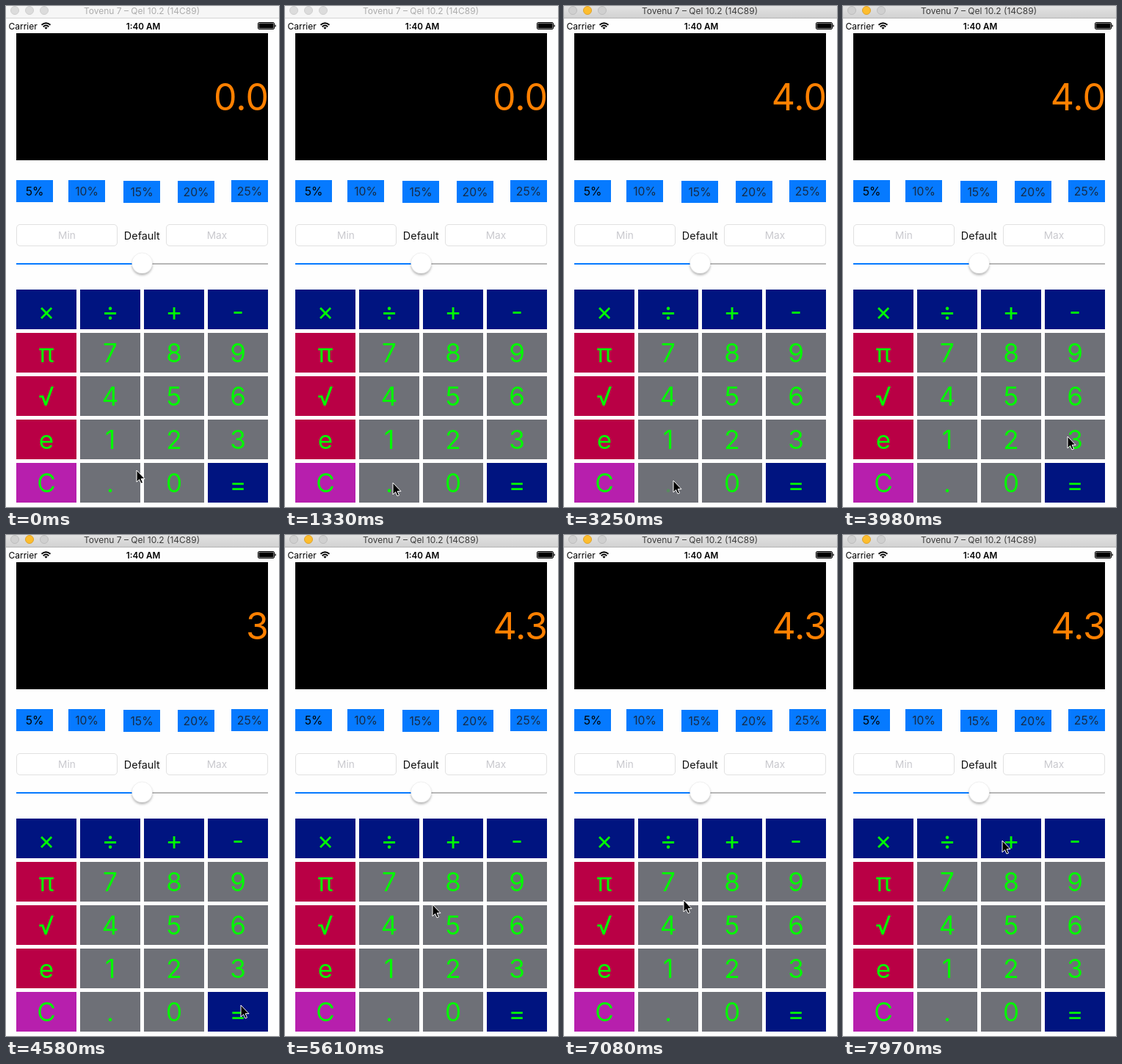
These frames come from a looping animation (372x682 px, 8000 ms). An HTML page:

```html
<!DOCTYPE html>
<html lang="en">
<head>
<meta charset="utf-8">
<title>Calculator</title>
<style>
  html, body { margin: 0; width: 100%; height: 100%; overflow: hidden; background: #fefefe; }
  svg { display: block; width: 372px; height: 682px; font-family: Inter, Roboto, sans-serif; }
  .mid { text-anchor: middle; }

  /* every animated part shares the 8 s loop and changes in hard steps */
  .anim { animation: 8s step-end infinite; }

  .active { animation-name: active; }
  @keyframes active { 0% { opacity: 0 } 29.5%, 100% { opacity: 1 } }

  .readout text { font-size: 50px; fill: #ff8000; text-anchor: end; }
  .r0 { animation-name: r0; }
  .r1 { animation-name: r1; }
  .r2 { animation-name: r2; }
  .r3 { animation-name: r3; }
  .r4 { animation-name: r4; }
  @keyframes r0 { 0% { opacity: 1 } 31.375%, 100% { opacity: 0 } }
  @keyframes r1 { 0% { opacity: 0 } 31.375% { opacity: 1 } 40.5%, 100% { opacity: 0 } }
  @keyframes r2 { 0% { opacity: 0 } 40.5% { opacity: 1 } 53.5%, 100% { opacity: 0 } }
  @keyframes r3 { 0% { opacity: 0 } 53.5% { opacity: 1 } 61%, 100% { opacity: 0 } }
  @keyframes r4 { 0% { opacity: 0 } 61%, 100% { opacity: 1 } }

  .keys text { font-size: 35px; fill: #00fa00; text-anchor: middle; }
  .press-four { animation-name: press-four; }
  .press-dot { animation-name: press-dot; }
  .press-three { animation-name: press-three; }
  .press-equals { animation-name: press-equals; }
  @keyframes press-four { 0%, 31.375%, 100% { opacity: 1 } 29.5% { opacity: .2 } }
  @keyframes press-dot { 0%, 44.375%, 100% { opacity: 1 } 38.875% { opacity: .2 } }
  @keyframes press-three { 0%, 53.5%, 100% { opacity: 1 } 51.625% { opacity: .2 } }
  @keyframes press-equals { 0%, 61%, 100% { opacity: 1 } 59.125% { opacity: .2 } }

  .pointer { animation-name: pointer; }
  @keyframes pointer {
    0%      { transform: translate(178px, 632px); animation-timing-function: steps(2) }
    3.625%  { transform: translate(248px, 656px); animation-timing-function: steps(2) }
    7.25%   { transform: translate(204px, 656px) }
    12.875% { transform: translate(194px, 667px); animation-timing-function: steps(2) }
    16.6%   { transform: translate(147px, 649px); animation-timing-function: steps(5) }
    25.75%  { transform: translate(142px, 539px) }
    31.375% { transform: translate(142px, 539px); animation-timing-function: steps(4) }
    38.875% { transform: translate(149px, 646px) }
    42.5%   { transform: translate(149px, 647px); animation-timing-function: steps(4) }
    49.75%  { transform: translate(306px, 586px) }
    53.5%   { transform: translate(310px, 605px); animation-timing-function: steps(2) }
    57.2%   { transform: translate(320px, 640px) }
    63%     { transform: translate(320px, 640px); animation-timing-function: steps(4) }
    70.1%   { transform: translate(201px, 503px) }
    72%     { transform: translate(186px, 419px); animation-timing-function: steps(2) }
    75.625% { transform: translate(162px, 419px) }
    79.25%  { transform: translate(196px, 468px); animation-timing-function: steps(2) }
    83%     { transform: translate(287px, 632px); animation-timing-function: steps(3) }
    88.45%  { transform: translate(163px, 497px) }
    90.25%  { transform: translate(130px, 478px) }
    92.125% { transform: translate(147px, 462px); animation-timing-function: steps(4) }
    99.6%, 100% { transform: translate(217px, 416px) }
  }
</style>
</head>
<body>
<svg viewBox="0 0 372 682">
  <defs>
    <linearGradient id="bar" x2="0" y2="1">
      <stop stop-color="#e2e2e2"/><stop offset="1" stop-color="#d1d1d1"/>
    </linearGradient>
    <filter id="shadow" x="-30%" y="-30%" width="160%" height="170%">
      <feDropShadow dx="0" dy="2.5" stdDeviation="1.8" flood-opacity=".27"/>
    </filter>
  </defs>
  <rect width="372" height="682" fill="#fefefe"/>

  <!-- window title, idle then focused -->
  <g>
    <path d="M0 0H372V17H0Z" fill="#f6f6f6"/>
    <path d="M0 16.5H372" stroke="#d5d5d5"/>
    <g fill="#dcdcdc" stroke="#cfcfcf">
      <circle cx="12" cy="6" r="5.5"/><circle cx="32" cy="6" r="5.5"/><circle cx="52" cy="6" r="5.5"/>
    </g>
    <text class="mid" x="185" y="11" font-size="12" fill="#acacac">Tovenu 7 – Qel 10.2 (14C89)</text>
  </g>
  <g class="anim active">
    <path d="M0 0H372V17H0Z" fill="url(#bar)"/>
    <path d="M0 16.5H372" stroke="#b4b4b4"/>
    <g fill="#d0d0d0" stroke="#bdbdbd">
      <circle cx="12" cy="6" r="5.5"/><circle cx="52" cy="6" r="5.5"/>
      <circle cx="32" cy="6" r="5.5" fill="#fdbd2e" stroke="#e0a32b"/>
    </g>
    <text class="mid" x="185" y="11" font-size="12" fill="#3c3c3c">Tovenu 7 – Qel 10.2 (14C89)</text>
  </g>

  <!-- status bar -->
  <text x="3.5" y="31.5" font-size="12">Carrier</text>
  <g fill="none" stroke="#000" stroke-width="1.9">
    <path d="M48.5 25.8Q54.5 20.6 60.5 25.8M50.7 28.2Q54.5 25 58.3 28.2"/>
    <path d="M52.4 29.5Q54.5 27.9 56.6 29.5L54.5 31.8Z" fill="#000" stroke="none"/>
  </g>
  <text class="mid" x="187" y="31.5" font-size="11.7" font-weight="600">1:40 AM</text>
  <rect x="343.5" y="22.5" width="22" height="9" rx="1.5" fill="#fff" stroke="#000"/>
  <rect x="344.5" y="23.5" width="20" height="7" rx=".6"/>
  <path d="M366.5 25.3Q368 25.5 368 27T366.5 28.8Z"/>

  <!-- readout -->
  <rect x="14" y="37" width="343" height="173"/>
  <g class="readout">
    <text class="anim r0" x="358" y="142">0.0</text>
    <text class="anim r1" x="358" y="142">4</text>
    <text class="anim r2" x="358" y="142">4.0</text>
    <text class="anim r3" x="358" y="142">3</text>
    <text class="anim r4" x="358" y="142">4.3</text>
  </g>

  <g id="tips" class="mid" font-size="15.7"></g>

  <!-- limits and slider -->
  <g fill="#fff" stroke="#e1e1e1">
    <rect x="14.5" y="297.5" width="137" height="29" rx="4.5"/>
    <rect x="218.5" y="297.5" width="138" height="29" rx="4.5"/>
  </g>
  <g class="mid" font-size="13.7" fill="#c9c9ce">
    <text x="83" y="317">Min</text><text x="287.5" y="317">Max</text>
    <text x="185.3" y="317.5" font-size="14.4" fill="#111">Default</text>
  </g>
  <path d="M185 351H357" stroke="#b7b7b7" stroke-width="2"/>
  <path d="M14 351H185" stroke="#067aff" stroke-width="2"/>
  <circle cx="185.5" cy="350" r="14" fill="#fff" stroke="#000" stroke-opacity=".1" stroke-width=".6" filter="url(#shadow)"/>

  <g id="keys" class="keys"></g>

  <path class="anim pointer" d="M0 0V16L3.6 12.6L6 18L8.5 17L6.2 11.6H11Z" stroke="#fff" stroke-linejoin="round"/>
</svg>
<script>
  const NS = 'http://www.w3.org/2000/svg';

  function add(parent, tag, attrs, label = '') {
    const el = document.createElementNS(NS, tag);
    for (const name in attrs) el.setAttribute(name, attrs[name]);
    el.textContent = label;
    parent.append(el);
  }

  const tips = document.getElementById('tips');
  [[14, 237], [85, 237], [160, 238], [234, 238], [307, 237]].forEach(([x, y], i) => {
    add(tips, 'rect', { x, y, width: 50, height: 30, fill: '#067aff' });
    add(tips, 'text', { x: x + 25, y: y + 21, fill: i ? '#172c48' : '#000' }, `${5 * (i + 1)}%`);
  });

  const keys = document.getElementById('keys');
  const pressed = { '4': 'four', '.': 'dot', '3': 'three', '=': 'equals' };

  function keyColor(key) {
    if ('×÷+-='.includes(key)) return '#001480';
    if ('π√e'.includes(key)) return '#b90045';
    return key === 'C' ? '#b71fad' : '#6e7077';
  }

  ['×÷+-', 'π789', '√456', 'e123', 'C.0='].forEach((line, row) => {
    [...line].forEach((key, col) => {
      const x = 14 + 87 * col, y = 386 + 59 * row;
      const drop = '×÷+-='.includes(key) ? 42 : 40;
      add(keys, 'rect', { x, y, width: 82, height: 54, fill: keyColor(key) });
      add(keys, 'text', {
        x: x + 41, y: y + drop,
        class: key in pressed ? `anim press-${pressed[key]}` : ''
      }, key);
    });
  });
</script>
</body>
</html>
```
